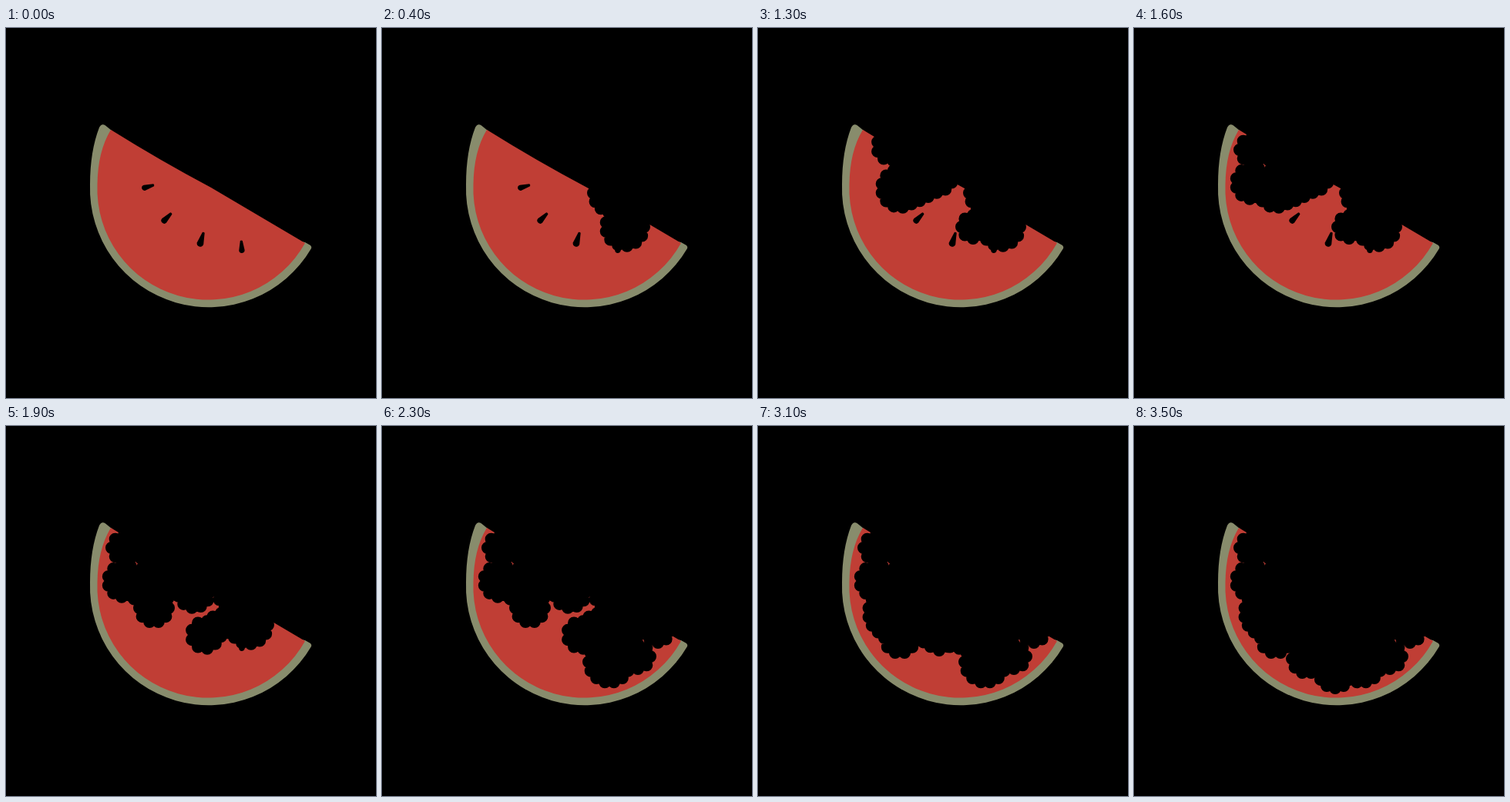
An HTML page for the animation above (3600 ms loop, 480 by 480 pixels).

```html
<!DOCTYPE html>
<html lang="en">
<head>
<meta charset="utf-8">
<title>Watermelon</title>
<style>
  html, body { margin: 0; width: 100%; height: 100%; overflow: hidden; background: #000; }
  svg { display: block; width: 100vw; height: 100vh; }
</style>
</head>
<body>
<svg id="stage" viewBox="0 0 480 480">
  <path fill="#888c6c" d="M137,133L129,126.5Q124,123 121,129Q109,160 109,203A154.1,154.1 0 0 0 396,286Q397,284 395,282L388,278L250,250Z"/>
  <path fill="#c03e35" d="M136,132Q119,160 118.5,203A144,144 0 0 0 388,279L266,207Q200,172 136,132Z"/>
</svg>
<script>
const LOOP = 3600;
const FIRST_BITE = 100;
const BITE_EVERY = 200;
const TOOTH = 16;
const TOOTH_GAP = 12;
const stage = document.getElementById('stage');

function add(parent, tag, attrs = {}) {
  const node = document.createElementNS('http://www.w3.org/2000/svg', tag);
  for (const key in attrs) node.setAttribute(key, attrs[key]);
  return parent.appendChild(node);
}

function seed(x, y, angle, length) {
  const h = length / 2, w = length * 0.23;
  add(stage, 'path', {
    transform: `translate(${x} ${y}) rotate(${angle})`,
    d: `M-1.5,${-h}Q0,${-h - 1} 1.5,${-h}L${w},${h - w}A${w},${w} 0 0 1 ${-w},${h - w}Z`
  });
}
seed(184, 206, 74, 16);
seed(208.5, 246.5, 44, 17);
seed(253.5, 274.5, 17, 19);
seed(305.7, 284, -3, 16);

// A disc whose round-dotted outline forms the tooth marks.
function disc(group, [cx, cy, r]) {
  add(group, 'circle', {
    cx, cy, r,
    pathLength: Math.round(2 * Math.PI * r / TOOTH_GAP),
    stroke: '#000',
    'stroke-width': TOOTH,
    'stroke-linecap': 'round',
    'stroke-dasharray': '0 1'
  });
}

// One entry per bite, in eating order: discs as [x, y, radius].
const bites = [
  [[300, 214, 26]],
  [[315, 258, 25]],
  [[229, 189, 25]],
  [[172, 154, 18]],
  [[279, 258, 15]],
  [[185, 208, 25]],
  [[204, 198, 27]],
  [[153, 158, 16], [153, 201, 21]],
  [[192, 236, 19], [244, 215, 21]],
  [[258, 271, 18]],
  [[332, 299, 16], [358, 266, 15]],
  [[295, 306, 27]],
  [[235, 275, 16]],
  [[267, 241, 16]],
  [[175, 242, 32]],
  [[184, 275, 20], [220, 255, 26]],
  [[224, 302, 19]],
  [[261, 318, 22]]
].map(discs => {
  const group = add(stage, 'g');
  discs.forEach(d => disc(group, d));
  return group;
});

function render(ms) {
  const eaten = Math.floor((ms % LOOP - FIRST_BITE) / BITE_EVERY) + 1;
  bites.forEach((bite, i) => { bite.style.display = i < eaten ? '' : 'none'; });
}

const start = performance.now();
function tick() {
  render(performance.now() - start);
  requestAnimationFrame(tick);
}
tick();
</script>
</body>
</html>
```
